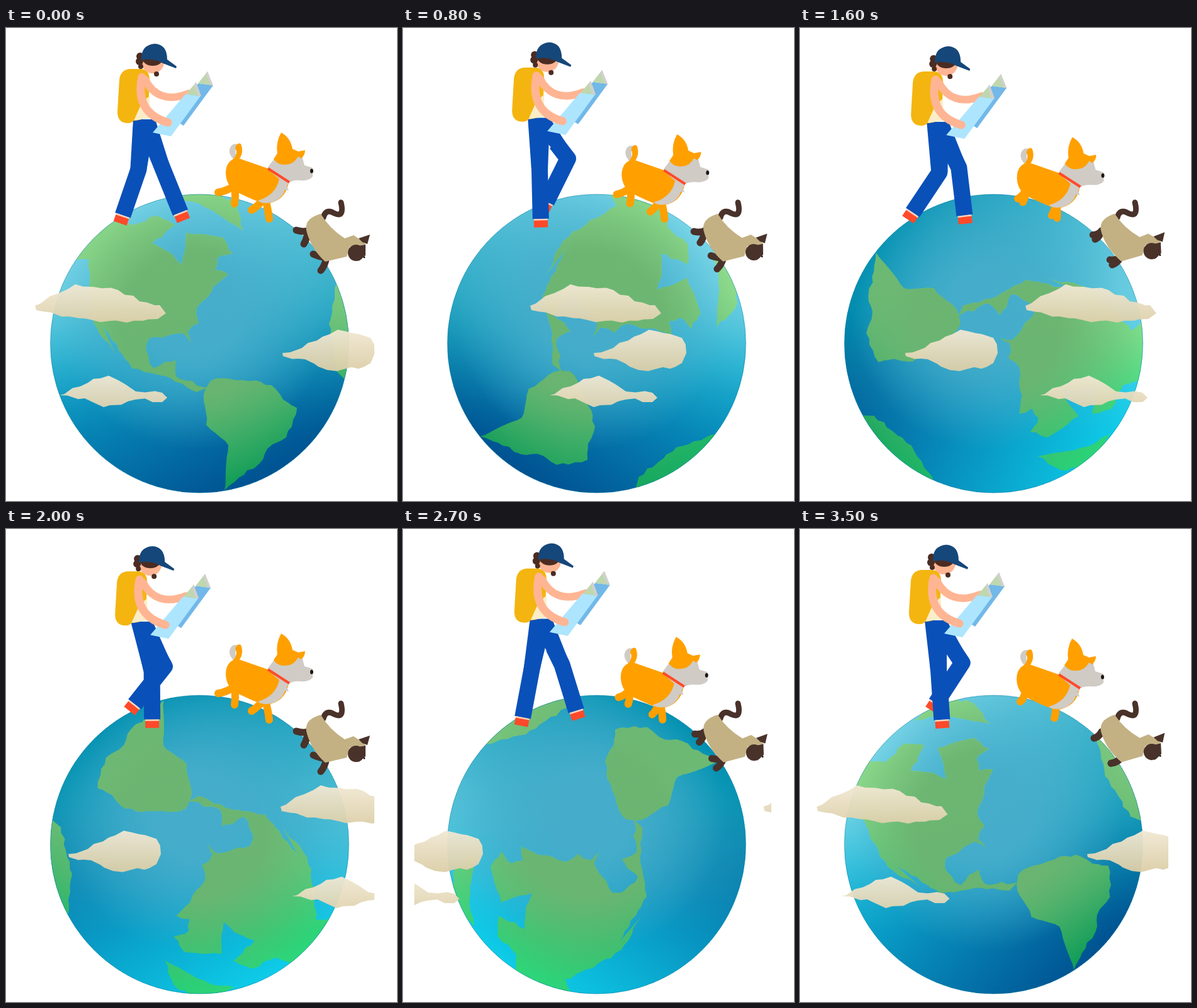
Recreate the animation shown at these times as an HTML page with a canvas. Size 621 px wide and 751 px high, loop 3600 ms.

```html
<!DOCTYPE html>
<html>
<head>
<meta charset="utf-8">
<style>
html, body { margin: 0; width: 100%; height: 100%; overflow: hidden; background: #fff; }
canvas { display: block; }
</style>
</head>
<body>
<canvas id="stage" width="621" height="751"></canvas>
<script>
const c = document.getElementById('stage').getContext('2d');
const { PI, sin, cos, abs, min, max, floor, hypot } = Math;
const CX = 307.5, CY = 501, R = 237;
const LOOP = 3600, STEP = 100, STRIDE = 1400, TROT = 1000;

const smooth = f => f * f * (3 - 2 * f);
const unit = f => min(1, max(0, f));
const blend = (a, b, f) => a + (b - a) * f;
const mix = (a, b, f) => a.map((v, i) => blend(v, b[i], f));
const rgb = (color, alpha = 1) => `rgba(${color},${alpha})`;

function fill(path, color) {
  c.fillStyle = color;
  c.fill(new Path2D(path));
}
function line(path, color, width, cap = 'round') {
  c.strokeStyle = color;
  c.lineWidth = width;
  c.lineCap = cap;
  c.lineJoin = 'round';
  c.stroke(new Path2D(path));
}
function dot(x, y, rx, color, ry = rx) {
  c.fillStyle = color;
  c.beginPath();
  c.ellipse(x, y, rx, ry, 0, 0, 2 * PI);
  c.fill();
}
function moved(x, y, turn, draw) {
  c.save();
  c.translate(x, y);
  c.rotate(turn);
  draw();
  c.restore();
}

// Closed outline through a few points, its edges broken up with seeded noise.
function rough(text, amount, pitch) {
  const points = text.split(' ').map(p => p.split(',').map(Number));
  let seed = 7;
  const noise = () => (seed = seed * 16807 % 2147483647) / 2147483647 - .5;
  const out = points.flatMap((a, i) => {
    const b = points[(i + 1) % points.length];
    const n = max(1, Math.round(hypot(b[0] - a[0], b[1] - a[1]) / pitch));
    return Array.from({ length: n }, (_, k) =>
      mix(a, b, k / n).map(v => v + (k ? noise() * amount : 0)));
  });
  return 'M' + out.join('L') + 'Z';
}

// Globe
const land = new Path2D([
  '85,400 70,330 150,290 200,313 240,298 268,313 232,342 263,358 279,376 286,325 345,333 360,358 335,366 332,384 353,391 330,410 303,444 306,468 288,484 294,500 282,485 228,492 222,510 234,540 253,530 270,528 270,553 322,572 303,578 262,556 200,540 168,495 151,470 174,520 139,468 131,415 133,368 108,370',
  '314,582 325,560 345,556 405,562 428,573 440,590 462,603 445,650 415,668 408,685 347,734 353,662 318,630',
  '268,270 325,255 365,281 377,322 335,295 302,277',
  '527,400 513,470 525,545 540,560 565,480'
].map(text => rough(text, 5, 10)).join(''));

// Each tone runs from its bright end to its dark end along the turning axis.
const SEA = { high: [[122, 214, 232], [0, 143, 176]], low: [[14, 204, 232], [0, 82, 145]],
  core: [70, 173, 203], y: 455, reach: 215, hold: .3 };
const GROUND = { high: [[150, 228, 148], [105, 186, 115]], low: [[46, 214, 122], [20, 156, 88]],
  core: [107, 180, 113], y: 470, reach: 255, hold: .45 };

function shade(angle, { high, low, core, y, reach, hold }) {
  const dx = R * cos(angle + 1.1), dy = R * sin(angle + 1.1);
  for (let row = CY - R; row < CY + R; row += 4) {
    const f = smooth(unit((row - 400) / 260));
    const grad = c.createLinearGradient(CX - dx, CY - dy, CX + dx, CY + dy);
    [0, 1].forEach(end => grad.addColorStop(end, rgb(mix(high[end], low[end], f))));
    c.fillStyle = grad;
    c.fillRect(CX - R, row, 2 * R, 5);
  }
  const glow = c.createRadialGradient(298, y, 0, 298, y, reach);
  [[0, .95], [hold, .95], [1, 0]].forEach(([at, alpha]) => glow.addColorStop(at, rgb(core, alpha)));
  c.fillStyle = glow;
  c.fillRect(CX - R, CY - R, 2 * R, 2 * R);
}
function globe(angle) {
  const disc = new Path2D();
  disc.arc(CX, CY, R, 0, 2 * PI);
  c.save();
  c.clip(disc);
  shade(angle, SEA);
  const spin = new DOMMatrix().translate(CX, CY).rotate(angle * 180 / PI).translate(-CX, -CY);
  const turned = new Path2D();
  turned.addPath(land, spin);
  c.clip(turned);
  shade(angle, GROUND);
  c.restore();
  c.strokeStyle = 'rgba(0,125,160,.5)';
  c.lineWidth = 1;
  c.stroke(disc);
}
// The turn starts gently, cruises, then quickens.
function turnAt(t) {
  const degrees = t < 800 ? t * .076 : t < 2500 ? 61 + (t - 800) * .0955 : 223 + (t - 2500) * .114;
  return degrees * PI / 180;
}

// Clouds cross the stage in one loop and come back on the other side.
const clouds = [
  { x: 46, speed: .195, top: 408,
    outline: '0,441 38,421 64,407 132,416 166,434 198,440 208,453 195,462 104,467 54,458 2,448' },
  { x: 439, speed: -.17, top: 479,
    outline: '0,516 31,508 64,490 88,479 122,486 140,492 147,516 140,532 121,541 71,543 36,526 1,521' },
  { x: 85, speed: .185, top: 552,
    outline: '0,583 33,569 54,557 78,552 105,566 121,577 163,579 171,587 163,594 120,590 70,602 40,588' }
].map(cloud => ({ ...cloud, shape: rough(cloud.outline, 7, 13) }));

function sky(t) {
  c.save();
  c.beginPath();
  c.rect(18, 390, 567, 230);
  c.clip();
  c.globalAlpha = .95;
  for (const { x, speed, top, shape } of clouds) {
    const span = abs(speed) * LOOP, edge = -100;
    const at = (x + speed * t - edge + span) % span + edge;
    const grad = c.createLinearGradient(0, top, 0, top + 62);
    grad.addColorStop(0, '#f1e8d3');
    grad.addColorStop(1, '#dccfa9');
    moved(at, 0, 0, () => fill(shape, grad));
  }
  c.restore();
}

// Walker
const SKIN = '#ffb593', HAIR = '#4b2c22', CAP = '#15477a', JEANS = '#0a50b9';
const BONE = 76.5, STANCE = 1600;

function ankle(t) {
  t %= 2 * STRIDE;
  if (t < STANCE) {
    const s = t / STANCE;
    return [179 + 98 * (1 - s) ** 1.3, 303 - 10 * (2 * s - 1) ** 2];
  }
  const s = (t - STANCE) / (2 * STRIDE - STANCE);
  return [179 + 98 * smooth(s), 293 - 17 * sin(PI * s)];
}
function leg(t, hx, hy) {
  const [ax, ay] = ankle(t);
  const dx = ax - hx, dy = ay - hy, d = hypot(dx, dy);
  const bend = Math.sqrt(max(0, BONE ** 2 - d * d / 4)) / d;
  const kx = hx + dx / 2 + dy * bend, ky = hy + dy / 2 - dx * bend;
  fill(`M${hx - 17},${hy - 4} H${hx + 18} L${kx + 13},${ky} H${kx - 13}Z`, JEANS);
  line(`M${blend(hx, kx, .6)},${blend(hy, ky, .6)} L${kx},${ky} ${ax},${ay}`, JEANS, 26, 'butt');
  moved(ax, ay, Math.atan2(ay - ky, ax - kx) - PI / 2, () => {
    c.fillStyle = '#ffd2bd';
    c.fillRect(-11, 0, 22, 3);
    c.fillStyle = '#ff4a2a';
    c.fillRect(-11, 2.5, 22, 11);
  });
}
function head() {
  dot(233, 54, 18, SKIN);
  dot(239, 73, 4, HAIR);
  dot(233, 49, 16, HAIR, 11);
  dot(213, 45, 6, HAIR);
  dot(212, 53, 6, HAIR);
  dot(214, 61, 4, HAIR);
  fill('M215,51 Q214,27 236,25 Q256,26 256,50 L271,61 270,64 249,56 Q234,47 215,51Z', CAP);
}
function map() {
  fill('M300,92 L306,88 329,91 282,155 274,150Z', '#72b8e8');
  fill('M305,88 L320,69 328,91Z', '#bfd7ae');
  fill('M320,69 L329,91 325,91 317,73Z', '#d2d0ce');
  fill('M233,166 L285,105 309,108 262,172Z', '#ade5ff');
  fill('M286,105 L302,86 308,108Z', '#bfd7ae');
  fill('M302,86 L310,108 305,108 299,90Z', '#d2d0ce');
}
function walker(t) {
  const phase = 2 * PI * t / STRIDE;
  const dx = 2 * cos(phase) - 2, dy = 5 * sin(phase);
  leg(t + STRIDE, 219 + dx, 149 + dy);
  leg(t, 219 + dx, 149 + dy);
  moved(dx, dy, 0, () => {
    fill('M197,65 H214 Q228,66 228,82 L226,132 Q222,147 203,147 Q200,151 194,151 Q177,151 177,133 L180,82 Q182,66 197,65Z', '#f4b510');
    fill('M203,147 L228,143 228,108 216,118Z', '#fbedc8');
    line('M221,82 C234,108 258,117 290,104', SKIN, 12);
    map();
    line('M216,78 C208,115 222,140 257,150', SKIN, 13);
    head();
  });
}

// Pets: spread is 1 with the legs apart and 0 with them together.
function paws(hip, mid, reach, spread, color, width) {
  for (const side of [-1, 1]) {
    const x = mid[0] + side * reach[0] * spread, y = mid[1] + side * reach[1] * spread;
    line(`M${hip} Q${(hip[0] + x) / 2 + 2},${(hip[1] + y) / 2 + 3} ${x},${y}`, color, width);
  }
}
function dog(spread, sink) {
  const FUR = '#ffa000', PALE = '#d0cbc5', dx = -5 * sink, dy = 8 * sink;
  paws([363 + dx, 250 + dy], [350, 270 + dy / 2], [13, 9], spread, FUR, 12);
  paws([411 + dx, 268 + dy], [404, 296 + dy / 2], [14, 7], spread, FUR, 12);
  moved(dx, dy, 0, () => {
    fill('M362,209 Q351,198 357,188 Q362,182 368,185 Q362,193 366,207Z', PALE);
    fill('M361,208 Q369,199 364,190 Q367,181 373,184 Q379,199 368,211Z', FUR);
    fill('M367,206 L416,223 449,246 Q443,275 414,279 Q405,279 372,263 Q350,254 349,231 Q349,210 367,206Z', FUR);
    fill('M416,224 L450,245 446,251 449,258 443,257 441,262 Q432,277 414,278 Q404,278 400,274 Q428,266 434,240Z', PALE);
    fill('M416,221 L428,205 455,205 470,203 474,218 487,222 487,236 Q481,243 468,242 Q458,241 450,245Z', PALE);
    fill('M425,208 L431,199 Q428,182 437,166 Q452,174 455,192 L464,196 475,194 Q475,202 469,207 L464,204 Q456,218 442,217 Q431,217 425,208Z', FUR);
    line('M416,223 L450,245', '#ff4a2a', 4, 'butt');
    dot(485.5, 227, 2.5, '#1d1715', 3.5);
  });
}
function cat(spread, sink) {
  const DARK = '#49322a', TAN = '#c3b183';
  line('M504,301 Q508,286 521,294 Q538,302 532,277', DARK, 9);
  paws([479, 322], [467, 332], [6, 11], spread, DARK, 11);
  paws([509, 364], [494, 372], [6, 13], spread, DARK, 11);
  moved(495, 300, -.05 * sink, () => {
    c.translate(-495, -300);
    fill('M478,325 Q471,303 500,295 Q513,318 538,334 L552,329 564,337 572,344 546,347 541,363 507,371 Q485,351 478,325Z', TAN);
    dot(556, 357, 13, DARK);
    fill('M560,334 L578,328 574,343 566,340Z M552,347 L571,344 571,361 560,370Z', DARK);
    dot(569, 364, 1.5, '#1d1715');
  });
}

function draw(now) {
  const t = floor((now % LOOP) / STEP) * STEP;
  const spread = abs(cos(PI * t / TROT));
  const sink = 1 - spread * spread;
  c.fillStyle = '#fff';
  c.fillRect(0, 0, 621, 751);
  globe(turnAt(t));
  sky(t);
  walker(t);
  dog(spread, sink);
  cat(spread, sink);
}
const start = performance.now();
function tick() {
  draw(performance.now() - start);
  requestAnimationFrame(tick);
}
tick();
</script>
</body>
</html>
```
